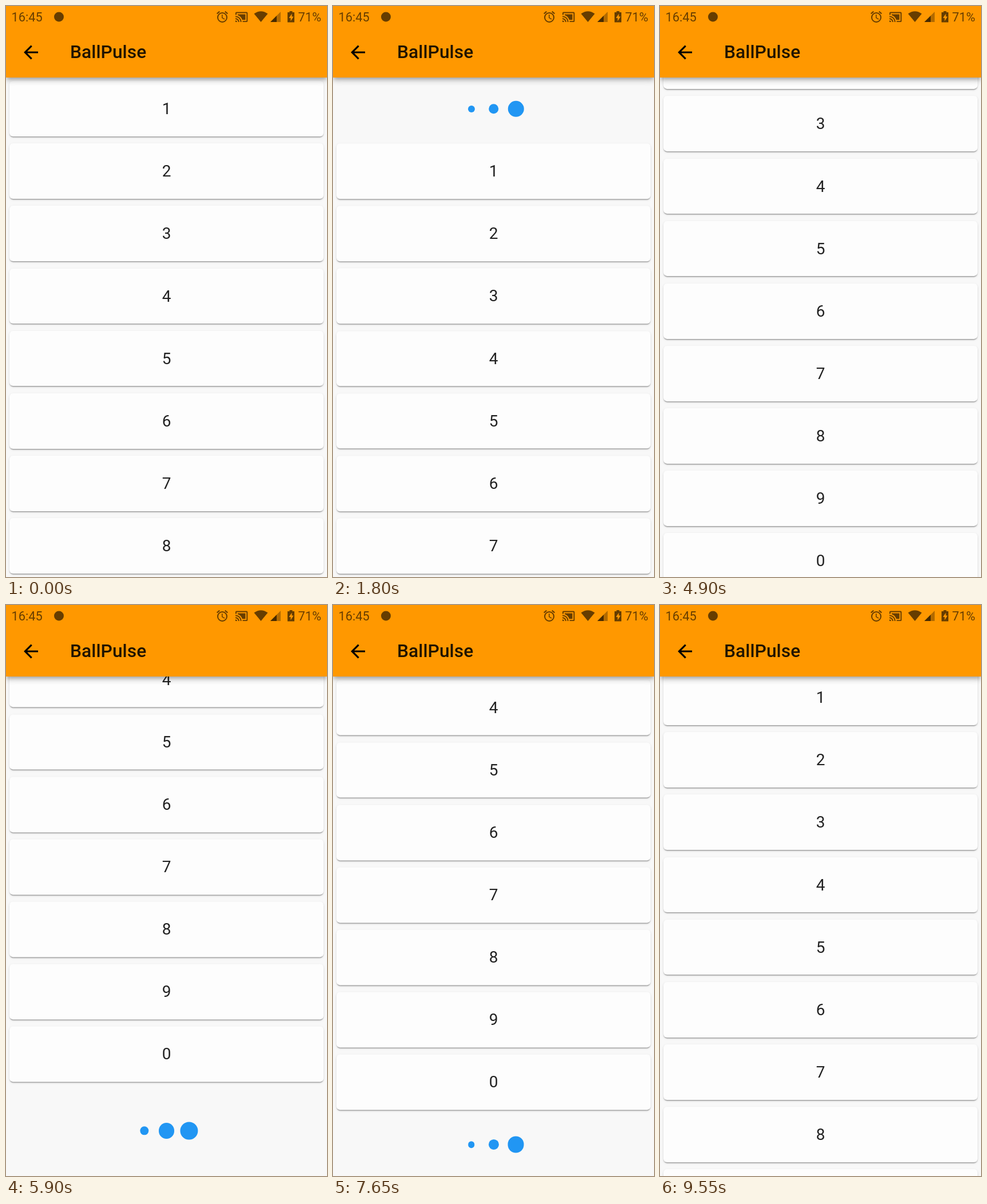
Write an HTML page that moves like this. It is 561 by 998 pixels and loops after 9.6 s.

```html
<!DOCTYPE html>
<html lang="en">
<head>
<meta charset="utf-8">
<title>BallPulse</title>
<style>
  html, body { margin: 0; width: 100%; height: 100%; overflow: hidden; }
  body { position: relative; background: #f8f8f8; font-family: Roboto, sans-serif; color: #212121; }
  #list { position: absolute; top: 125px; left: 0; width: 561px; }
  .card {
    height: 96.7px; margin: 6.2px 6.2px 12.45px; border-radius: 6.2px; background: #fdfdfd;
    box-shadow: 0 3px 1.5px -1.5px rgba(0,0,0,.2), 0 1.5px 1.5px rgba(0,0,0,.14), 0 1.5px 4.5px rgba(0,0,0,.1);
    font-size: 28px; line-height: 97px; text-align: center;
  }
  .pulse { position: absolute; left: 0; width: 561px; overflow: hidden; }
  .ball { position: absolute; top: 50%; border-radius: 50%; background: #2196f3; transform: translate(-50%, -50%); }
  #bar {
    position: absolute; top: 0; left: 0; width: 561px; height: 125px; background: #ff9800;
    box-shadow: 0 3px 6px -1.5px rgba(0,0,0,.2), 0 6px 8px rgba(0,0,0,.14), 0 1.5px 15px rgba(0,0,0,.12);
  }
  svg { display: block; }
</style>
</head>
<body>
<div id="list"></div>
<div class="pulse" id="header" style="top:125px"></div>
<div class="pulse" id="footer" style="top:auto;bottom:0"></div>
<div id="bar">
  <svg width="561" height="125" font-family="Roboto, sans-serif">
    <g fill="#000" fill-opacity=".6">
      <text x="9.5" y="27.3" font-size="21.8">16:45</text>
      <text x="510.5" y="27.3" font-size="21.8">71%</text>
      <circle cx="92.5" cy="19" r="8.5"/>
      <path transform="translate(366 7)" d="M22 5.72l-4.6-3.86-1.29 1.53 4.6 3.86zM7.88 3.39L6.6 1.86 2 5.71l1.29 1.53zM12.5 8H11v6l4.75 2.85.75-1.23-4-2.37zM12 4a9 9 0 1 0 0 18a9 9 0 1 0 0-18zm0 16a7 7 0 1 1 0-14a7 7 0 1 1 0 14z" fill-rule="evenodd"/>
      <path transform="translate(400 7.7) scale(.97)" d="M21 3H3c-1.1 0-2 .9-2 2v3h2V5h18v14h-7v2h7c1.1 0 2-.9 2-2V5c0-1.1-.9-2-2-2zM1 18v3h3c0-1.66-1.34-3-3-3zm0-4v2c2.76 0 5 2.24 5 5h2c0-3.87-3.13-7-7-7zm0-4v2c4.97 0 9 4.03 9 9h2c0-6.08-4.93-11-11-11zM19 7H5v1.63c3.96 1.28 7.09 4.41 8.37 8.37H19z"/>
      <path d="M433.5 13.5Q445.500 5 457.500 13.500L445.500 28z"/>
      <path d="M480 10V28H462z" fill-opacity=".3"/>
      <path d="M473 17V28H462z"/>
      <path d="M495.500 9h5v2h3.500v17.500h-12v-17.500h3.500zM499.500 13.500l-5 7.500h3v5.500l5-8h-3z" fill-rule="evenodd"/>
    </g>
    <path transform="translate(24.900 62.300) scale(1.558)" d="M20 11H7.830l5.590-5.590L12 4l-8 8 8 8 1.410-1.410L7.830 13H20z"/>
    <text x="112" y="91" font-size="31.800" font-weight="500" fill-opacity=".87">BallPulse</text>
  </svg>
</div>
<script>
const LOOP = 9600, STEP = 50, DP = 561 / 360, VIEW = 873;
const BOTTOM = 218.4, EXTENT = 109.2;
const $ = id => document.getElementById(id);

// [time, scroll offset]; negative pulls the header out, above BOTTOM the footer
const path = [
  [-50, 18], [0, 0], [100, -8], [200, 0], [450, 0],
  [700, -90.6], [950, -148], [1400, -EXTENT], [3495, -EXTENT], [4085, 0],
  [4350, 0], [4500, 35], [4700, 35], [4950, BOTTOM], [5010, BOTTOM + 8], [5100, BOTTOM],
  [5450, BOTTOM], [5900, 376.6], [6400, BOTTOM + EXTENT], [8450, BOTTOM + EXTENT],
  [9050, BOTTOM], [9300, BOTTOM], [9550, 18], [9600, 0], [9700, -8]
];
const slope = i => {
  const a = path[i], b = path[i + 1];
  return a && b ? (b[1] - a[1]) / (b[0] - a[0]) : 0;
};
// Monotone tangents: zero at turning points and rests
const tangent = i => {
  const a = slope(i - 1), b = slope(i);
  return a * b > 0 ? 2 * a * b / (a + b) : 0;
};
function scrollAt(t) {
  const i = path.findIndex((p, k) => t < path[k + 1][0]);
  const [t0, y0] = path[i], [t1, y1] = path[i + 1];
  const d = t1 - t0, u = (t - t0) / d, v = 1 - u;
  return v * v * (1 + 2 * u) * y0 + u * u * (3 - 2 * u) * y1
       + d * u * v * (v * tangent(i) - u * tangent(i + 1));
}

// Ball diameters in dp, one phase every 200 ms, capped by the 20 dp slot
const phases = [[6, 13, 20], [13, 6, 13], [20, 13, 6], [13, 22, 26]];
function ballSize(k, t, origin, stop) {
  const x = (Math.min(t, stop) - origin) / 200 + 400;
  const n = Math.floor(x), a = phases[n % 4][k], b = phases[(n + 1) % 4][k];
  const fade = Math.max(0, 1 - Math.max(0, t - stop) / 200);
  return Math.min(20, a + (b - a) * (x - n)) * fade * DP;
}

$('list').innerHTML = [...'1234567890'].map(n => `<div class="card">${n}</div>`).join('');
for (const id of ['header', 'footer'])
  $(id).innerHTML = [-1, 0, 1].map(k => `<div class="ball" style="left:${280.5 + 39 * k}px"></div>`).join('');

function drawPulse(id, height, t, origin, stop) {
  const box = $(id);
  box.style.height = Math.max(0, height) + 'px';
  [...box.children].forEach((ball, k) => {
    ball.style.width = ball.style.height = ballSize(k, t, origin, stop) + 'px';
  });
}
function draw(now) {
  const t = Math.floor(now % LOOP / STEP) * STEP, y = scrollAt(t);
  $('list').style.transform = `translateY(${-y}px)`;
  drawPulse('header', -y, t, 150, 3750);
  drawPulse('footer', y - BOTTOM, t, 7610, 8610);
}
const start = performance.now();
function tick() {
  draw(performance.now() - start);
  requestAnimationFrame(tick);
}
tick();
</script>
</body>
</html>
```
